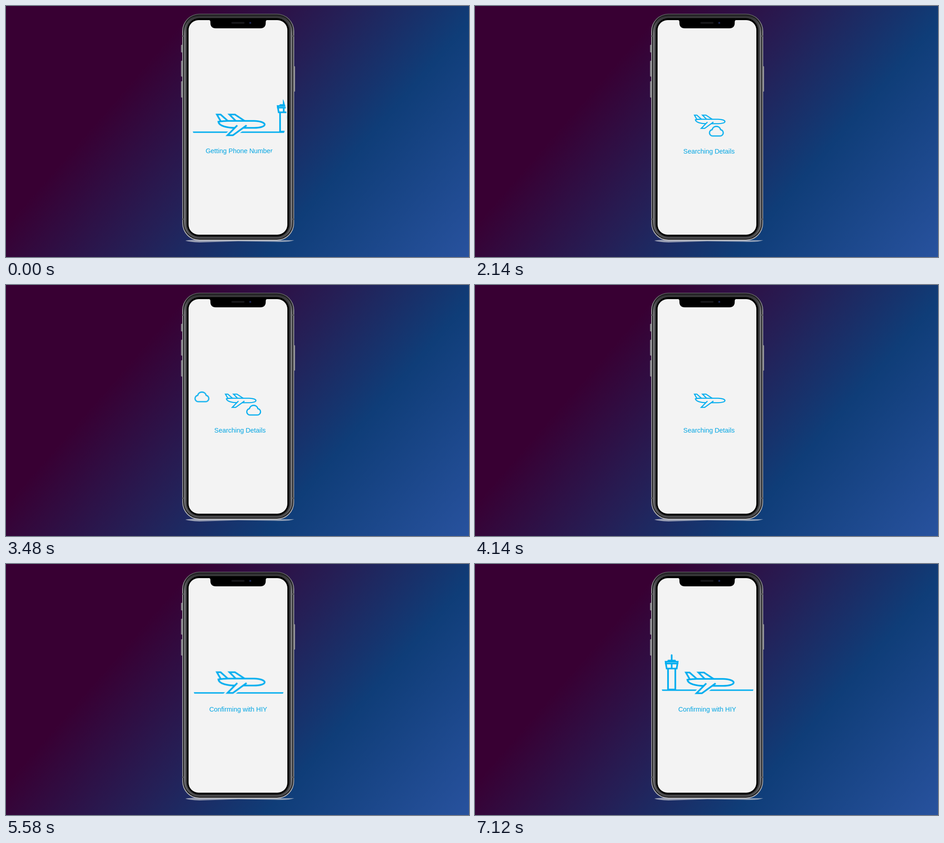
These frames come from a looping animation (1017 px wide and 551 px high, 7.18 s). An HTML page:

```html
<!DOCTYPE html>
<html lang="en">
<head>
<meta charset="utf-8">
<title>Flight lookup</title>
<style>
html, body { margin: 0; width: 100%; height: 100%; overflow: hidden; }
body {
  background: linear-gradient(131deg, #380033 0 28%, #251f56 50%, #0f3d78 70%, #28529e 100%);
}
svg { position: absolute; left: 0; top: 0; display: block; }

.ink { fill: none; stroke: #00adef; stroke-width: 3.6; }
.solid { fill: #f3f3f3; }
.puff { fill: #f3f3f3; stroke-width: 2.6; }
.label {
  font: 14.4px "Liberation Sans", Arial, sans-serif;
  fill: #00a5e3;
  text-anchor: middle;
}

.ground, .tower, .plane, .cloud, .mark, .label {
  animation: 7180ms linear infinite;
}
.ground { animation-name: ground; }
.tower { animation-name: tower; }
.plane { animation-name: plane; }
.low { animation-name: low; }
.high { animation-name: high; }
.mark { animation-name: mark; }
.first { animation-name: first; }
.second { animation-name: second; }
.third { animation-name: third; }

@keyframes ground {
  0%, 9% { transform: translateY(0); }
  9% { animation-timing-function: cubic-bezier(.45, .1, .75, .6); }
  15.32% { transform: translateY(33px); }
  21%, 72.5% { transform: translateY(78px); }
  72.5% { animation-timing-function: cubic-bezier(.25, .5, .6, .95); }
  77.72% { transform: translateY(6px); animation-timing-function: ease-out; }
  80.5%, 100% { transform: translateY(0); }
}
@keyframes tower {
  0%, 4.457% { transform: translate(610px, 277px) scaleY(.92); }
  4.457% { animation-timing-function: cubic-bezier(.5, 0, .85, .6); }
  14% { transform: translate(380px, 277px) scaleY(.92); animation-timing-function: step-end; }
  78% { transform: translate(650px, 277px); animation-timing-function: cubic-bezier(.2, .5, .5, 1); }
  99.16%, 100% { transform: translate(432px, 277px); }
}
@keyframes plane {
  0%, 8.4% { transform: translate(515.5px, 261px) rotate(0deg) scale(1); }
  8.4% { animation-timing-function: ease-in-out; }
  15.32% {
    transform: translate(516px, 259.1px) rotate(-15deg) scale(.955);
    animation-timing-function: ease-in-out;
  }
  22.5%, 68.2% { transform: translate(515.4px, 254.1px) rotate(0deg) scale(.638); }
  68.2% { animation-timing-function: ease-in-out; }
  76.3%, 77.72% { transform: translate(515.5px, 260.3px) rotate(0deg) scale(1); }
  80.5%, 100% { transform: translate(515.5px, 261px) rotate(0deg) scale(1); }
}
@keyframes low {
  0% { transform: translate(635px, 274.8px); animation-timing-function: step-end; }
  25.74%, 44.94% { transform: translate(635px, 274.8px); }
  35.31%, 54.51% { transform: translate(389px, 274.8px); animation-timing-function: step-end; }
  100% { transform: translate(389px, 274.8px); }
}
@keyframes high {
  0% { transform: translate(635px, 245.6px); animation-timing-function: step-end; }
  40.52%, 59.74% { transform: translate(635px, 245.6px); }
  50.09%, 69.31% { transform: translate(389px, 245.6px); animation-timing-function: step-end; }
  100% { transform: translate(389px, 245.6px); }
}
@keyframes mark {
  0%, 13.8% { opacity: 0; }
  14.8%, 15.8% { opacity: 1; }
  16.6%, 100% { opacity: 0; }
}
@keyframes first {
  0%, 4.457% { opacity: 1; }
  8.5%, 100% { opacity: 0; }
}
@keyframes second {
  0%, 22% { opacity: 0; }
  25.5%, 64% { opacity: 1; }
  67.3%, 100% { opacity: 0; }
}
@keyframes third {
  0%, 73.5% { opacity: 0; }
  77%, 100% { opacity: 1; }
}
</style>
</head>
<body>
<svg width="1017" height="551" viewBox="0 0 1017 551">
  <defs>
    <clipPath id="port"><circle cx="511" cy="244" r="105.5"/></clipPath>
    <linearGradient id="rim" x2="0" y2="1">
      <stop offset="0" stop-color="#5c5c5f"/>
      <stop offset=".08" stop-color="#9a9a9c"/>
      <stop offset=".9" stop-color="#8c8c8f"/>
      <stop offset="1" stop-color="#c0c0c2"/>
    </linearGradient>
    <linearGradient id="bevel" x2="0" y2="1">
      <stop offset="0" stop-color="#2c2c2e"/>
      <stop offset=".08" stop-color="#77777a"/>
      <stop offset=".92" stop-color="#77777a"/>
      <stop offset="1" stop-color="#4a4a4c"/>
    </linearGradient>
    <path id="puff" d="M-8.2 10.5H8.2A7 7 0 0 0 9.3 -3.4A9.6 9.6 0 0 0 -9.3 -3.4A7 7 0 0 0 -8.2 10.5Z"/>
    <path id="wing" d="M508 262L486.5 283.7H498.5L528.5 262"/>
  </defs>

  <!-- phone -->
  <path d="M394 515Q420 511 510 513T633 514Q622 519 590 517.5L510 516.5L425 519Q402 518 394 515Z" fill="#c3c6cf" opacity=".75"/>
  <g fill="#8b8b90">
    <rect x="384.5" y="85" width="3.5" height="17" rx="1.5"/>
    <rect x="384.5" y="120" width="3.5" height="35" rx="1.5"/>
    <rect x="384.5" y="165" width="3.5" height="36" rx="1.5"/>
    <rect x="631.5" y="132" width="3.5" height="56" rx="1.5"/>
  </g>
  <rect x="387" y="17" width="246" height="498" rx="38" fill="url(#rim)"/>
  <rect x="389" y="18.5" width="242" height="494.5" rx="36" fill="#1d1d1f"/>
  <rect x="391" y="21" width="238" height="490" rx="34" fill="url(#bevel)"/>
  <rect x="394.5" y="24" width="231" height="484" rx="31" fill="#3b3b3d"/>
  <rect x="397.5" y="26.5" width="224.5" height="479.5" rx="27" fill="#000"/>
  <path d="M386.5 66h5M386.5 468h5M628.5 66h5M628.5 468h5" stroke="#56565a" stroke-width="2.5"/>
  <rect x="401" y="31" width="217" height="471" rx="22" class="solid"/>
  <path d="M445 30.5Q449 31 449 35V37Q449 49 461 49H558.5Q570.5 49 570.5 37V35Q570.5 31 574.5 30.5Z" fill="#000"/>
  <rect x="495" y="35" width="29" height="4" rx="2" fill="#17171a"/>
  <circle cx="536.5" cy="37" r="2.6" fill="#10142c"/>
  <circle cx="536.5" cy="37" r="1.1" fill="#2b3f86"/>

  <!-- scene -->
  <g clip-path="url(#port)">
    <g class="ground">
      <g class="tower">
        <path class="ink solid" d="M-8 -46V-1.5H8V-46"/>
        <path class="ink solid" d="M-13.3 -62.5H13.3L11 -47.5H-11Z"/>
        <path class="ink" d="M-13 -58.5H13M0 -58V-48M-7.5 -65H7.5M0 -65V-77" stroke-linecap="round"/>
      </g>
      <path class="ink" d="M400 277H622" style="stroke-width:3"/>
    </g>

    <g class="cloud high"><use href="#puff" class="ink puff"/></g>

    <g class="plane">
      <g transform="translate(-515.5 -261)">
        <use href="#wing" fill="#f3f3f3" stroke="#f3f3f3" stroke-width="10"/>
        <g class="ink" style="fill:#f3f3f3">
          <path d="M472 253.5L463.3 238.3H471.5L487 252"/>
          <path d="M504.5 252L490.8 238.3H503L524.5 252.5"/>
          <path d="M466.5 254Q478 252 490 252.2H545C558 252.5 568.2 256 568.2 260.3S558 267.5 545 267.5H503C488 267.5 467.5 264 466.5 254Z"/>
          <use href="#wing"/>
        </g>
      </g>
    </g>
    <path class="ink mark" d="M529.5 268.3L538.5 266.3" style="stroke-width:1.8"/>

    <g class="cloud low"><use href="#puff" class="ink puff"/></g>

    <text class="label first" x="512" y="322.8">Getting Phone Number</text>
    <text class="label second" x="514" y="324.3">Searching Details</text>
    <text class="label third" x="510" y="323.8">Confirming with HIY</text>
  </g>
</svg>
</body>
</html>
```
